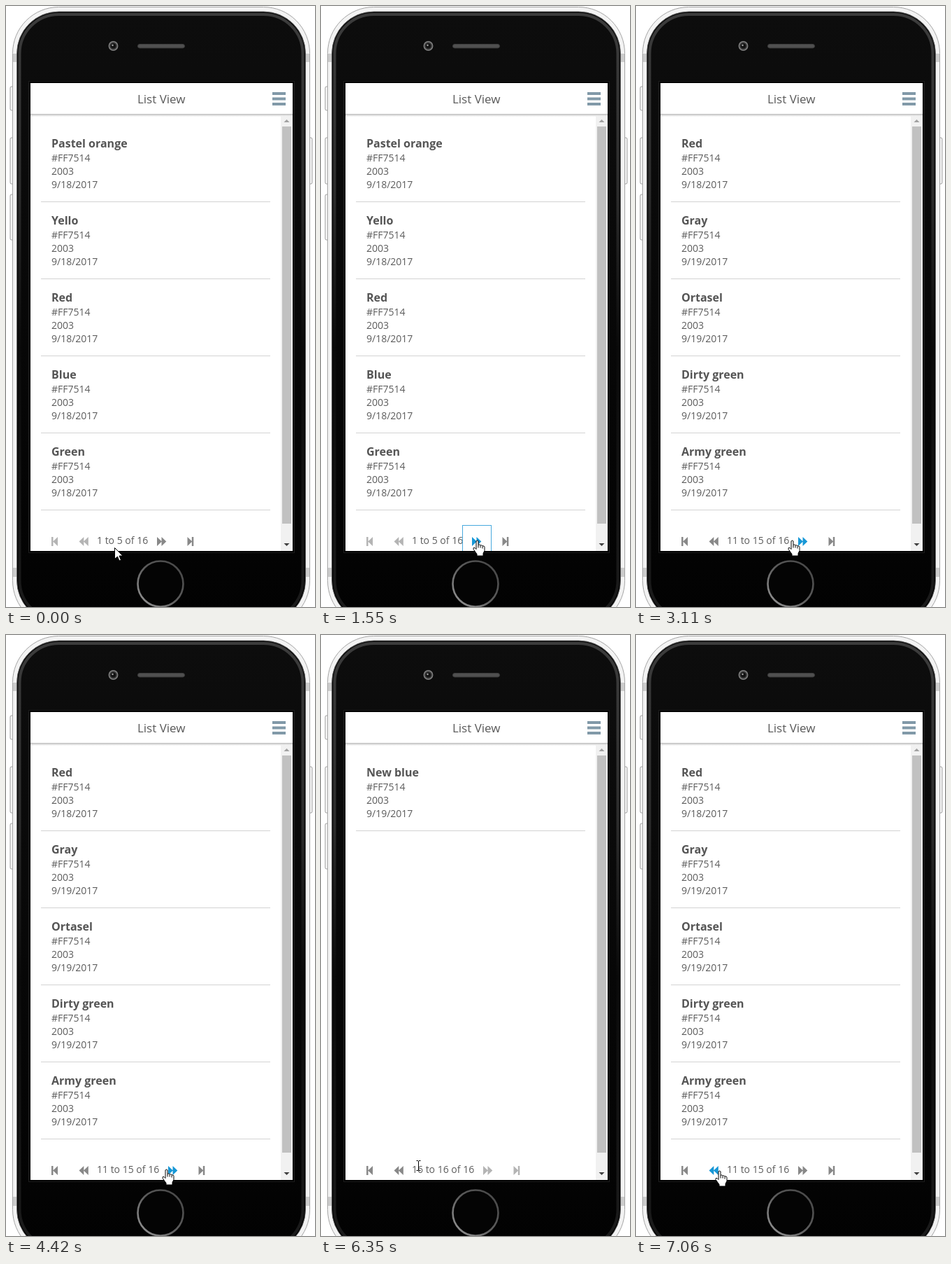
An HTML page for the animation above (8 s loop, 442 by 858 pixels).

```html
<!DOCTYPE html>
<html lang="en">
<head>
<meta charset="utf-8">
<title>List View</title>
<style>
  html, body { margin: 0; width: 100%; height: 100%; overflow: hidden; background: #fff; }
  svg { display: block; width: 442px; height: 858px; }
  text { font: 14px "Open Sans", sans-serif; fill: #5c5c5c; white-space: pre; }
  .name { font-size: 16px; font-weight: 700; fill: #555; }
  .heading { font-size: 17px; fill: #5a5a5a; }
</style>
</head>
<body>
<svg viewBox="0 0 442 858">
  <defs>
    <linearGradient id="glass" x2="0" y2="1">
      <stop offset="0" stop-color="#0d0d0d"/><stop offset="1" stop-color="#020202"/>
    </linearGradient>
    <linearGradient id="sheen" x2="0" y2="1">
      <stop offset="0" stop-color="#3c3c3c"/><stop offset=".3" stop-color="#2c2c2c"/>
      <stop offset=".55" stop-color="#0a0a0a"/><stop offset="1" stop-color="#1c1c1c"/>
    </linearGradient>
    <linearGradient id="ring" x1="1" x2="0" y2="1">
      <stop offset="0" stop-color="#444"/><stop offset=".5" stop-color="#5c5c5c"/><stop offset="1" stop-color="#999"/>
    </linearGradient>
    <linearGradient id="shade" x2="0" y2="1">
      <stop offset="0" stop-color="#bbb"/><stop offset="1" stop-color="#fff"/>
    </linearGradient>
    <clipPath id="screen"><rect x="35" y="110" width="375" height="668"/></clipPath>
  </defs>

  <g fill="#f4f4f4" stroke="#8c8c8c" stroke-width=".8">
    <rect x="6" y="115" width="5" height="34" rx="2"/>
    <rect x="6" y="188" width="5" height="66" rx="2"/>
    <rect x="6" y="269" width="5" height="65" rx="2"/>
    <rect x="433" y="188" width="5" height="66" rx="2"/>
  </g>
  <rect x="9.5" y="1.5" width="425" height="885" rx="66" fill="#f3f3f3" stroke="#a4a4a4"/>
  <g fill="#ccc">
    <rect x="10" y="68" width="6" height="12"/><rect x="428" y="68" width="6" height="12"/>
    <rect x="10" y="802" width="6" height="13"/><rect x="428" y="802" width="6" height="13"/>
  </g>
  <rect x="15.5" y="8" width="413" height="872" rx="60" fill="url(#glass)" stroke="#666" stroke-width=".8"/>
  <rect x="19.5" y="12" width="405" height="864" rx="56" fill="none" stroke="url(#sheen)" stroke-width="4"/>
  <rect x="32.5" y="107.5" width="380" height="673" fill="#000" stroke="#1c1c1c"/>
  <circle cx="153.5" cy="57" r="6.2" fill="#3a3a3a" stroke="#808080" stroke-width="1.5"/>
  <circle cx="153.5" cy="57" r="3.6" fill="#111"/>
  <circle cx="152.5" cy="56" r="1.2" fill="#aaa"/>
  <rect x="188.5" y="54.5" width="67" height="5.5" rx="2.7" fill="#505050" stroke="#3a3a3a"/>
  <circle cx="221" cy="825" r="32.5" fill="#040404" stroke="url(#ring)" stroke-width="2.6"/>

  <g clip-path="url(#screen)">
    <rect x="35" y="110" width="375" height="668" fill="#fff"/>
    <rect x="35" y="154" width="375" height="4" fill="url(#shade)"/>
    <text class="heading" x="188" y="139">List View</text>
    <path d="M381 125h19M381 132.5h19M381 140h19" stroke="#8199a8" stroke-width="4"/>
    <rect x="393" y="157" width="17" height="621" fill="#f1f1f1"/>
    <rect x="395" y="172" width="13" height="567" fill="#c1c1c1"/>
    <path d="M397.5 166h8l-4-4z" fill="#a0a0a0"/>
    <path d="M397.5 767h8l-4 4z" fill="#404040"/>
    <g id="list"></g>
    <g id="pager"></g>
  </g>
  <g id="cursor"></g>
</svg>
<script>
const LOOP = 8000;
const BLUE = '#1797d6', ENABLED = '#888', DISABLED = '#b4b4b4';
const byId = id => document.getElementById(id);

const pages = [
  { names: ['Pastel orange', 'Yello', 'Red', 'Blue', 'Green'], label: '1 to 5 of 16', end: 203, dates: [18, 18, 18, 18, 18] },
  { names: ['Violet', 'Indigo', 'Skye blue', 'Brown', 'Black'], label: '6 to 10 of 16', end: 211, dates: [18, 18, 18, 18, 18] },
  { names: ['Red', 'Gray', 'Ortasel', 'Dirty green', 'Army green'], label: '11 to 15 of 16', end: 219, dates: [18, 19, 19, 19, 19] },
  { names: ['New blue'], label: '16 to 16 of 16', end: 219, dates: [19] }
];
const pageTurns = [[0, 0], [1790, 1], [3030, 2], [4810, 3], [6970, 2]];

// Each move: start, end, steps, target x, target y, upward bow, easing power
const moves = [
  [80, 620, 8, 231, 763, 6, 1],
  [790, 1020, 4, 223, 762, 0, 1],
  [4420, 4500, 2, 235, 762, 0, 1],
  [5830, 6590, 11, 125, 764, 9, 1.6],
  [6670, 6820, 3, 119, 764, 0, 1]
];

const cursors = {
  arrow: '<path d="M0 0V16L4 12.5 6.5 18.5 9 17.5 6.5 11.5H11.5Z" fill="#fff" stroke="#000"/>',
  beam: '<path d="M-3-7h2.5M.5-7h2.5M0-6.5V6.5M-3 7h2.5M.5 7h2.5" fill="none" stroke="#000"/>',
  hand: '<path d="M-1.5 1.5Q0-.5 1.5 1.5V7Q3 5.5 4.5 7.5 6.5 6.5 7.5 8.5 10 7.5 10.5 10V15L8.5 19V22.5H-.5V20L-5.5 13Q-6 10-3.5 11L-1.5 13Z" fill="#fff" stroke="#000"/>' +
    '<path d="M1.5 7v4M4.5 8v3M7.5 9v3" stroke="#000"/>'
};

function pointerAt(t) {
  let x = 155, y = 773;
  for (const [start, end, steps, toX, toY, bow, power] of moves) {
    if (t < start) break;
    const progress = Math.min(1, (t - start) / (end - start));
    const u = (Math.floor(progress * (steps - 1) + .2) + 1) / steps;
    const eased = 1 - (1 - u) ** power;
    x += (toX - x) * eased;
    y += (toY - y) * eased - bow * Math.sin(Math.PI * u);
  }
  return { x, y };
}

function drawList(page) {
  return page.names.map((name, i) => {
    const y = 170 + i * 110;
    return `<text class="name" x="65" y="${y + 32}">${name}</text>
      <text x="65" y="${y + 52}">#FF7514</text>
      <text x="65" y="${y + 71}">2003</text>
      <text x="65" y="${y + 90}">9/${page.dates[i]}/2017</text>
      <path d="M50 ${y + 109.5}h328" stroke="#d3d3d3"/>`;
  }).join('');
}

function drawPager(index, hovered, focused) {
  const { label, end } = pages[index];
  const back = index > 0 ? ENABLED : DISABLED;
  const forward = index < 3 ? ENABLED : DISABLED;
  const icon = (d, color) => `<path d="${d}" fill="${color}"/>`;
  const left = x => `M${x} 764.5l6.8-6.5v13z`;
  const right = x => `M${x} 758l6.8 6.5-6.8 6.5z`;
  const bar = x => `M${x} 758h2.5v13h-2.5z`;
  return icon(bar(65) + left(67.2), back) +
    icon(left(104.5) + left(111), hovered === 'prev' ? BLUE : back) +
    `<text x="130" y="768">${label}</text>` +
    icon(right(end + 13) + right(end + 19.5), hovered === 'next' ? BLUE : forward) +
    icon(right(end + 56.5) + bar(end + 62.8), forward) +
    (focused ? '<rect x="202.5" y="741.5" width="41" height="40" fill="none" stroke="#48a9dd"/>' : '');
}

function setContent(id, markup) {
  const node = byId(id);
  if (node.markup !== markup) node.innerHTML = node.markup = markup;
}

function render(t) {
  const index = pageTurns.filter(([start]) => t >= start).pop()[1];
  const page = pages[index];
  const loading = t >= 1710 && t < 1790;
  const { x, y } = pointerAt(t);

  let hovered = '';
  if (y < 772) {
    if (x >= page.end && x < page.end + 41 && index < 3) hovered = 'next';
    if (x >= 91 && x < 130 && index > 0) hovered = 'prev';
  }
  const overText = y < 772 && x >= 130 && x < page.end;
  const kind = hovered ? 'hand' : overText ? 'beam' : 'arrow';

  setContent('list', loading ? '' : drawList(page));
  setContent('pager', drawPager(index, hovered, t >= 1550 && t < 1710));
  setContent('cursor', cursors[kind]);
  byId('cursor').setAttribute('transform', `translate(${Math.round(x) + .5} ${Math.round(y) + .5})`);
}

const begin = performance.now();
function tick() {
  render((performance.now() - begin) % LOOP);
  requestAnimationFrame(tick);
}
tick();
</script>
</body>
</html>
```
